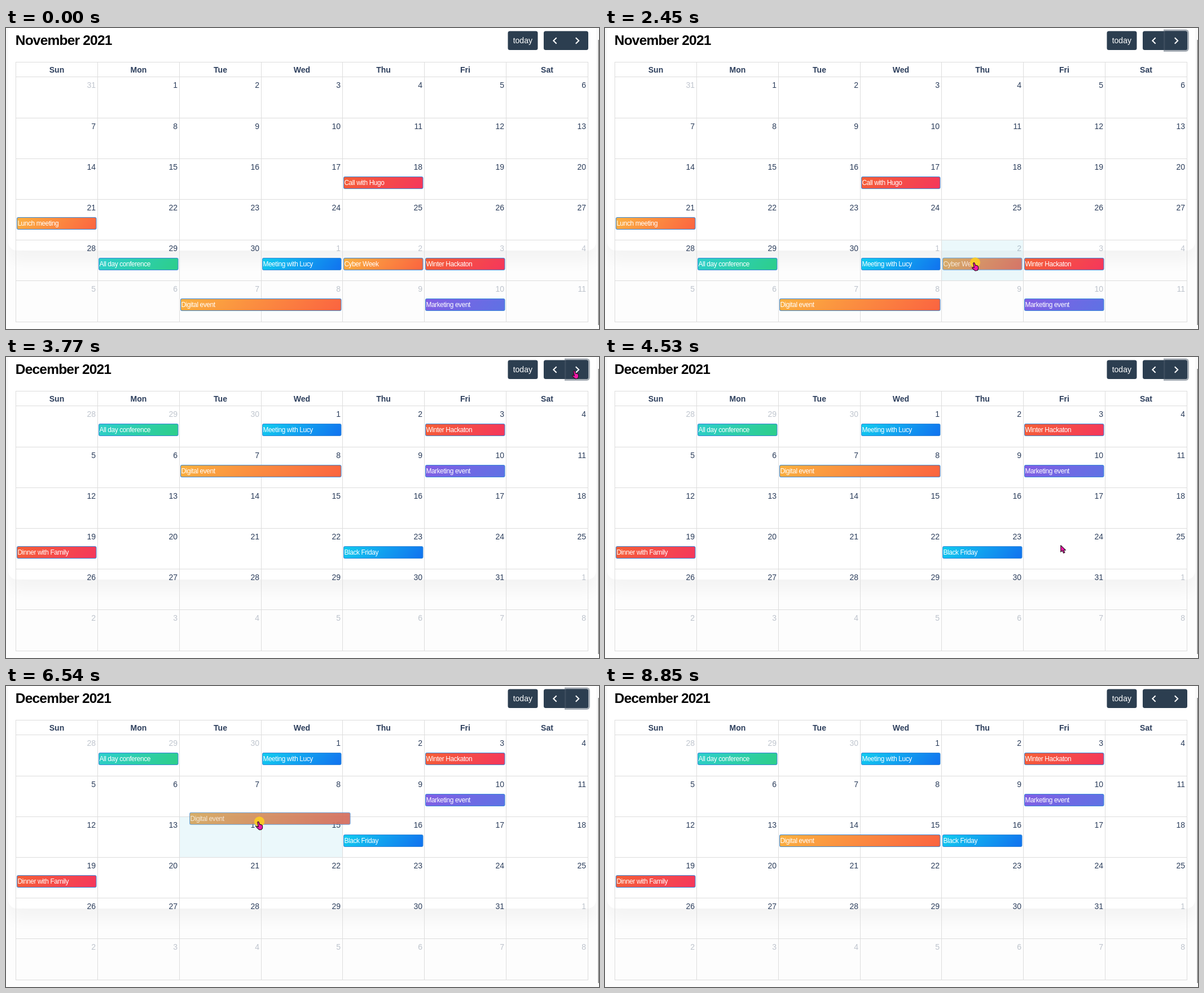
Write an HTML page with a canvas that moves like this. It is 1051 px wide and 533 px high and loops after 8.92 s.

```html
<!DOCTYPE html>
<html lang="en">
<head>
<meta charset="utf-8">
<title>Calendar</title>
<style>
html, body { margin: 0; width: 100%; height: 100%; overflow: hidden; background: #fdfdfd; }
canvas { display: block; }
</style>
</head>
<body>
<canvas id="stage" width="1051" height="533"></canvas>
<script>
const ctx = document.getElementById('stage').getContext('2d');
const LOOP = 8920;
const FONT = '"Liberation Sans", Arial, sans-serif';
const INK = '#2c3e5c';
const DARK = '#2c3e50';
const TURN = 3700;              // the month changes
const FOCUS = [1090, 8850];     // focus ring on the next button
const CLICK = [3630, 3770];

const colX = i => Math.round(17 + 144.86 * i);
const rowY = i => Math.round(86.4 + 72.2 * i);

const RED = ['#f56036', '#f5365c'];
const ORANGE = ['#fbb140', '#fb6340'];
const GREEN = ['#2dcecc', '#2dce89'];
const BLUE = ['#11cdef', '#1171ef'];
const PURPLE = ['#825ee4', '#5e72e4'];

const ev = (name, colors, col, row, span = 1) => ({ name, colors, col, row, span });
const november = [
  ev('Call with Hugo', RED, 4, 2),
  ev('Lunch meeting', ORANGE, 0, 3),
  ev('All day conference', GREEN, 1, 4),
  ev('Meeting with Lucy', BLUE, 3, 4),
  ev('Cyber Week', ORANGE, 4, 4),
  ev('Winter Hackaton', RED, 5, 4),
  ev('Digital event', ORANGE, 2, 5, 2),
  ev('Marketing event', PURPLE, 5, 5)
];
const december = [
  ev('All day conference', GREEN, 1, 0),
  ev('Meeting with Lucy', BLUE, 3, 0),
  ev('Winter Hackaton', RED, 5, 0),
  ev('Digital event', ORANGE, 2, 1, 2),
  ev('Marketing event', PURPLE, 5, 1),
  ev('Dinner with Family', RED, 0, 3),
  ev('Black Friday', BLUE, 4, 3)
];
const months = [
  { title: 'November 2021', index: 10, first: new Date(2021, 9, 31), events: november },
  { title: 'December 2021', index: 11, first: new Date(2021, 10, 28), events: december }
];

const drags = [
  { event: november[0], from: 1090, to: 1600, col: 3, row: 2 },
  { event: november[4], from: 2250, to: 3010, col: 4, row: 3 },
  { event: december[6], from: 5030, to: 5530, col: 4, row: 2 },
  { event: december[3], from: 6320, to: 6890, col: 2, row: 2 }
];

// time, x, y of the pointer's hot spot
const path = [
  [190, 956, 471], [480, 810, 390], [760, 695, 295], [900, 678, 274], [1020, 678, 274],
  [1090, 667, 273], [1390, 564, 272], [1530, 534, 273], [1600, 534, 273],
  [1780, 585, 320], [1960, 642, 386], [2250, 656, 415.5], [2450, 656, 415.5],
  [2940, 655, 330], [3010, 655, 333], [3080, 670, 310], [3280, 837, 130],
  [3490, 1009, 24], [3840, 1009, 24], [4190, 927, 151], [4530, 808, 333],
  [4680, 700, 354], [5030, 700, 354], [5460, 680, 281], [5600, 680, 281],
  [5670, 501, 222], [5810, 440, 209], [5910, 430, 206], [6170, 430, 205], [6320, 433, 207.5],
  [6540, 449, 240], [6820, 473, 288], [6890, 473, 288], [7170, 470, 290],
  [7600, 470, 290], [8370, 1062, 508]
];

function pointer(t) {
  if (t < path[0][0] || t >= path[path.length - 1][0]) return null;
  const i = path.findIndex(p => p[0] > t);
  const a = path[i - 1], b = path[i];
  const k = (t - a[0]) / (b[0] - a[0]);
  return { x: a[1] + (b[1] - a[1]) * k, y: a[2] + (b[2] - a[2]) * k };
}

function box(x, y, w, h, r, fill) {
  ctx.beginPath();
  ctx.roundRect(x, y, w, h, r);
  ctx.fillStyle = fill;
  ctx.fill();
}

function text(str, x, y, font, color, align = 'left', spacing = 0) {
  ctx.font = font + ' ' + FONT;
  ctx.letterSpacing = spacing + 'px';
  ctx.textAlign = align;
  ctx.fillStyle = color;
  ctx.fillText(str, x, y);
}

function place(e, t) {
  const d = drags.find(d => d.event === e);
  const moved = d && t >= d.to;
  const col = moved ? d.col : e.col;
  const row = moved ? d.row : e.row;
  const r = { x: colX(col) + 2, y: rowY(row) + 32, h: 22, held: false };
  r.w = colX(col + e.span) - 2 - r.x + 0.5;
  if (d && t >= d.from && t < d.to) {
    const a = pointer(d.from), b = pointer(t);
    r.x += b.x - a.x;
    r.y += b.y - a.y;
    r.held = true;
  }
  return r;
}

function drawEvent(e, r) {
  const sin = 0.766, cos = 0.643;
  const half = (r.w * sin + r.h * cos) / 2;
  const cx = r.x + r.w / 2, cy = r.y + r.h / 2;
  const g = ctx.createLinearGradient(cx - sin * half, cy - cos * half, cx + sin * half, cy + cos * half);
  g.addColorStop(0, e.colors[0]);
  g.addColorStop(1, e.colors[1]);
  ctx.save();
  ctx.globalAlpha = r.held ? 0.75 : 1;
  box(r.x, r.y, r.w, r.h, 3, '#3788d8');
  box(r.x + 1, r.y + 1, r.w - 2, r.h - 2, 2, g);
  text(e.name, r.x + 1.4, r.y + 15.2, '11.9px', '#fff', 'left', -0.4);
  ctx.restore();
}

function drawPage() {
  ctx.fillStyle = '#fdfdfd';
  ctx.fillRect(0, 0, 1051, 533);
  ctx.save();
  ctx.shadowColor = 'rgba(0,0,0,0.04)';
  ctx.shadowBlur = 27;
  ctx.shadowOffsetY = 20;
  box(4, -40, 1042, 434, 15, '#fff');
  ctx.restore();
  ctx.fillStyle = '#858585';
  ctx.fillRect(1049.5, 21, 1.5, 505);
}

function chevron(x, y, dir) {
  ctx.beginPath();
  ctx.moveTo(x - 2.7 * dir, y - 5.3);
  ctx.lineTo(x + 2.7 * dir, y);
  ctx.lineTo(x - 2.7 * dir, y + 5.3);
  ctx.strokeStyle = '#fff';
  ctx.lineWidth = 2;
  ctx.stroke();
}

function drawToolbar(title, focused) {
  text(title, 16.8, 30, 'bold 24.5px', '#000', 'left', -0.8);
  box(889.5, 5.5, 53, 33.5, 3.5, DARK);
  text('today', 915.8, 27, '14px', '#fff', 'center');
  box(953, 5.5, 79, 33.5, 3.5, DARK);
  if (focused) {
    box(990, 2.5, 45, 39.5, [0, 6, 6, 0], 'rgba(76,91,106,0.5)');
    box(992.5, 5.5, 39.5, 33.5, [0, 3.5, 3.5, 0], DARK);
  }
  chevron(973, 22.5, -1);
  chevron(1012.5, 22.5, 1);
}

function drawGrid(month, held) {
  if (held) {
    // the cell under the middle of the first day of the held event
    const { r, span } = held;
    const col = Math.floor((r.x + 70 - 17) / 144.86);
    const row = Math.floor((r.y + 11 - 86.4) / 72.2);
    ctx.fillStyle = 'rgba(188,232,241,0.3)';
    ctx.fillRect(colX(col), rowY(row), colX(col + span) - colX(col), rowY(row + 1) - rowY(row));
  }
  ctx.fillStyle = '#ddd';
  for (let i = 0; i <= 7; i++) ctx.fillRect(colX(i), 60, 1, 461);
  ctx.fillRect(17, 60, 1015, 1);
  for (let i = 0; i <= 6; i++) ctx.fillRect(17, rowY(i), 1015, 1);

  'Sun Mon Tue Wed Thu Fri Sat'.split(' ').forEach((name, i) =>
    text(name, (colX(i) + colX(i + 1)) / 2 + 0.5, 79, 'bold 14px', INK, 'center'));

  const f = month.first;
  for (let i = 0; i < 42; i++) {
    const date = new Date(f.getFullYear(), f.getMonth(), f.getDate() + i);
    ctx.globalAlpha = date.getMonth() === month.index ? 1 : 0.3;
    text(date.getDate(), colX(i % 7 + 1) - 3, rowY(Math.floor(i / 7)) + 20, '14px', INK, 'right');
  }
  ctx.globalAlpha = 1;
}

const arrow = new Path2D('M.5 .5V12L3.2 9.7L5.4 14L7.6 13L5.6 8.9H9.3Z');
const hand = new Path2D('M2.6 2.2Q3.6 .4 5 1.8L6.8 6.3L8.4 6Q11 6.6 11.5 8.6' +
  'L11.6 12Q11.3 14 9.4 15.2L6 15.6L1 11.2Q.2 9.6 1.8 9.2L4.3 10.2Z');

function drawPointer(p, pressed, linked) {
  if (pressed) {
    ctx.beginPath();
    ctx.arc(p.x, p.y, 9, 0, Math.PI * 2);
    ctx.fillStyle = 'rgba(255,208,30,0.85)';
    ctx.fill();
  }
  ctx.save();
  ctx.translate(p.x - (linked ? 6 : 0), p.y - (linked ? 1 : 0));
  const shape = linked ? hand : arrow;
  ctx.fillStyle = '#f218a8';
  ctx.fill(shape);
  ctx.strokeStyle = '#20101c';
  ctx.lineWidth = 1.1;
  ctx.lineJoin = 'round';
  ctx.stroke(shape);
  ctx.restore();
}

const inside = (p, r) => p.x >= r.x && p.x <= r.x + r.w && p.y >= r.y && p.y <= r.y + r.h;
const between = (t, [a, b]) => t >= a && t < b;

function draw(t) {
  const month = months[t < TURN ? 0 : 1];
  const placed = month.events.map(e => ({ e, r: place(e, t), span: e.span }));
  const held = placed.find(o => o.r.held);
  drawPage();
  drawToolbar(month.title, between(t, FOCUS));
  drawGrid(month, held);
  placed.filter(o => o !== held).forEach(o => drawEvent(o.e, o.r));
  if (held) drawEvent(held.e, held.r);

  const p = pointer(t);
  if (!p) return;
  const targets = placed.map(o => o.r);
  targets.push({ x: 889, y: 5, w: 53, h: 34 }, { x: 953, y: 5, w: 79, h: 34 });
  drawPointer(p, held || between(t, CLICK), held || targets.some(r => inside(p, r)));
}

const start = performance.now();
function tick() {
  draw((performance.now() - start) % LOOP);
  requestAnimationFrame(tick);
}
tick();
</script>
</body>
</html>
```
